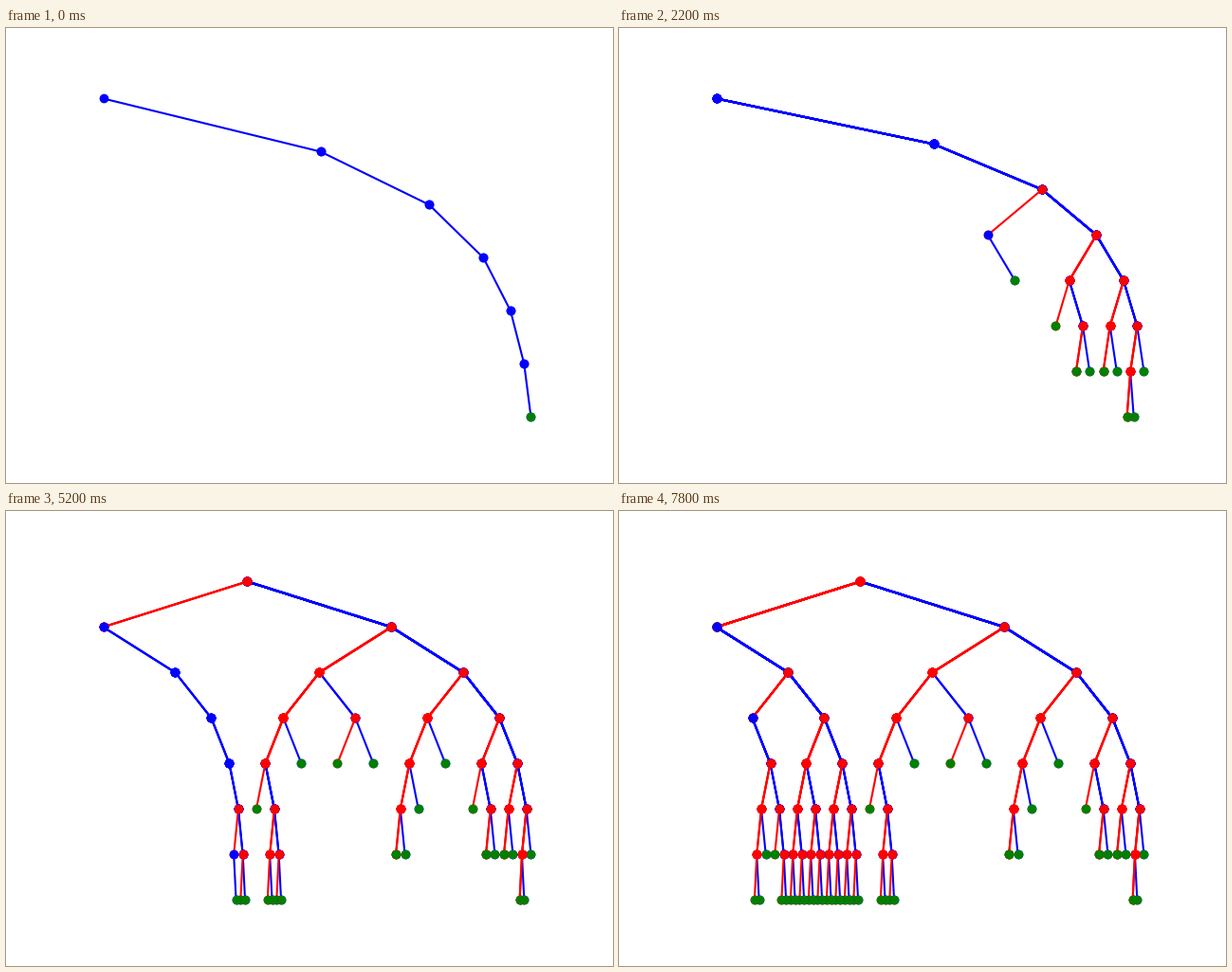
These frames come from a looping animation (640 by 480 pixels, 8000 ms). A matplotlib script:

```python
import matplotlib.pyplot as plt
from matplotlib.animation import FuncAnimation

# One word per frame: the leaf reached, as turns from the root.
# A trailing "*" means both leaves below that node are reached at once.
STEPS = """
RRRRRR RRRRRLR RRRRRLL RRRRRLL RRRRLR RRRRLL RRRRLL RRRLRR
RRRLRL RRRLRL RRRLL RRLR RRLLR RRLLLR RRLLLL RRLLLL RLRR
RLRL RLLR RLLLRRR RLLLRRL RLLLRLR
RLLLRLL RLLLL LRRRRRR LRRRRRL LRRRRLR
LRRRRLL LRRRLRR LRRRLRL LRRRLLR LRRRLLL LRRLRR*
LRRLRL* LRRLLR* LRRLLL* LRLRRR* LRLRRL LRLRLR LRLRLL*
""".split()
MARGIN = 0.05


def expand(step):
    if step.endswith("*"):
        return [step[:-1] + "R", step[:-1] + "L"]
    return [step]


def trace(path):
    """Node positions from the root down to the leaf."""
    x, nodes = 0.0, [(0.0, 0)]
    for depth, turn in enumerate(path, 1):
        x += (1 if turn == "R" else -1) * 0.5 ** depth
        nodes.append((x, -depth))
    return nodes


def limits(values):
    lo, hi = min(values), max(values)
    pad = MARGIN * (hi - lo)
    return lo - pad, hi + pad


def draw_path(path):
    nodes = trace(path)
    lines = []
    for turn, (x0, y0), (x1, y1) in zip(path, nodes, nodes[1:]):
        style = "bo-" if turn == "R" else "ro-"
        lines += ax.plot([x0, x1], [y0, y1], style)
    lines += ax.plot(*nodes[-1], "go")
    return nodes, lines


fig = plt.figure(figsize=(6.4, 4.8), dpi=100, facecolor="white")
ax = fig.add_axes([0.125, 0.11, 0.775, 0.77])
ax.axis("off")

# Everything is drawn once; a frame only shows its share and refits the view.
artists, views, xs, ys = [], [], [], []
for i, step in enumerate(STEPS):
    for path in expand(step):
        nodes, lines = draw_path(path)
        artists += [(i, line) for line in lines]
        xs += [x for x, _ in nodes]
        ys += [y for _, y in nodes]
    views.append((limits(xs), limits(ys)))


def update(frame):
    for born, line in artists:
        line.set_visible(born <= frame)
    xlim, ylim = views[frame]
    ax.set_xlim(xlim)
    ax.set_ylim(ylim)
    return [line for _, line in artists]


anim = FuncAnimation(fig, update, frames=len(STEPS), interval=200,
                     init_func=lambda: update(0), repeat=True,
                     repeat_delay=0, blit=False)
plt.show()
```
